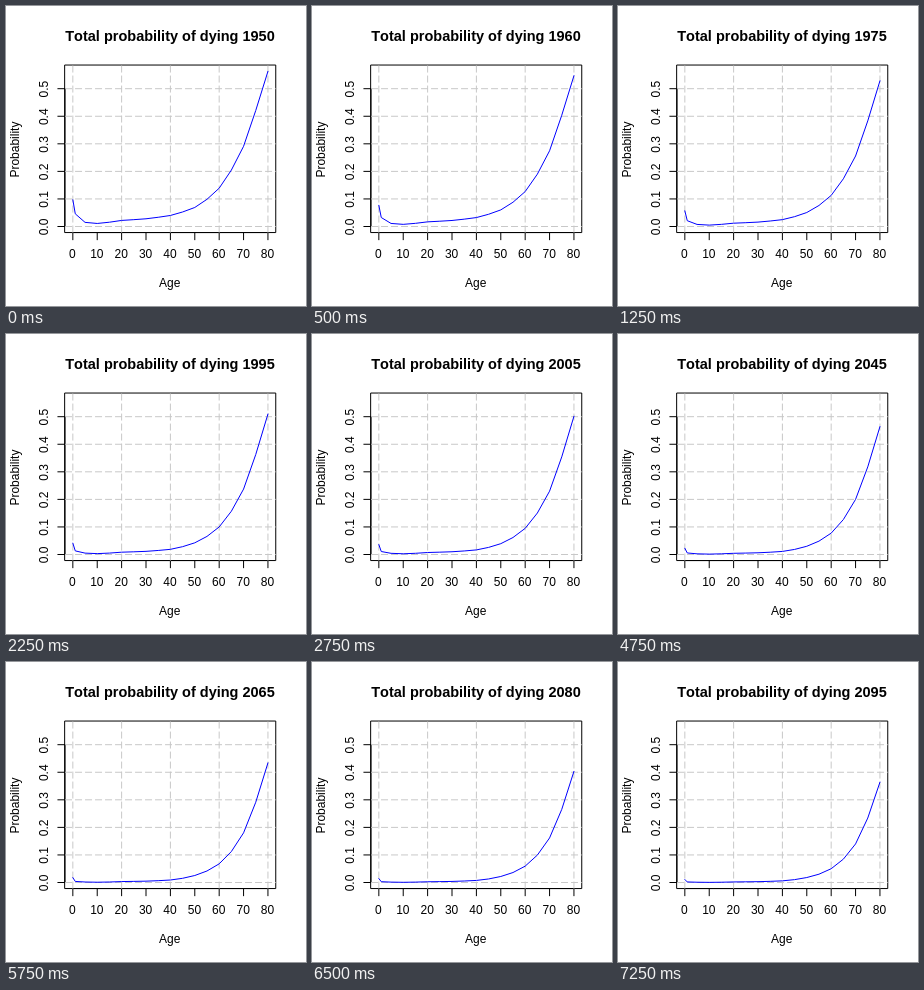
An HTML page that plays this animation: 300x300 px, repeating every 7500 ms.

```html
<!DOCTYPE html>
<html lang="en">
<head>
<meta charset="utf-8">
<title>Total probability of dying</title>
<style>
  html, body { margin: 0; height: 100%; overflow: hidden; background: #fff; }
  svg { display: block; width: 100vw; height: 100vh; }
  text { font: 12px "Liberation Sans", Arial, sans-serif; font-kerning: none; text-anchor: middle; fill: #000; }
  .title { font-size: 14.5px; font-weight: bold; }
  path { fill: none; stroke: #000; stroke-width: 1; stroke-linecap: round; stroke-linejoin: round; }
  .grid { stroke: #c8c8c8; stroke-dasharray: 7 3; stroke-linecap: butt; }
  .curve { stroke: #00f; }
</style>
</head>
<body>
<svg viewBox="0 0 300 300"></svg>
<script>
const STEP = 250, YEARS = 30;
const LEFT = 59.04, TOP = 59.04, RIGHT = 269.76, BOTTOM = 226.56, TICK = 7.2;
const MID_X = (LEFT + RIGHT) / 2, MID_Y = (TOP + BOTTOM) / 2;

// Age, then deaths per thousand in the first and the last year
const keys = [
  [0, 97, 11], [1, 46, 2], [5, 15, 1], [10, 11, .5], [20, 22, 2], [30, 28, 3],
  [40, 40, 6], [50, 69, 18], [60, 139, 50], [70, 291, 140], [80, 563, 364]
];
const ages = [0, 1];
for (let age = 5; age <= 80; age += 5) ages.push(age);

const logit = n => Math.log(n / (1000 - n));
const mix = (a, b, f) => a + (b - a) * f;

// How far the decline has come at t from 0 to 1; it lags at old ages
function decline(age, t) {
  const old = Math.max(0, (age - 40) / 40);
  return 1.75 * (t - t * t) + t ** 3 + old * (t ** 3 - t) / 2;
}

// Logistic rate, linear in logit space between the key ages
function rate(age, t) {
  const k = Math.max(1, keys.findIndex(key => key[0] >= age));
  const [a, b] = [keys[k - 1], keys[k]];
  const f = (age - a[0]) / (b[0] - a[0]);
  const first = mix(logit(a[1]), logit(b[1]), f);
  const last = mix(logit(a[2]), logit(b[2]), f);
  return 1 / (1 + Math.exp(-mix(first, last, decline(age, t))));
}

const px = age => 66.84 + 2.4389 * age;
const py = p => 220.5 - 275.6 * p;

const svg = document.querySelector("svg");
function add(tag, attrs, text = "") {
  const el = document.createElementNS(svg.namespaceURI, tag);
  for (const key in attrs) el.setAttribute(key, attrs[key]);
  el.textContent = text;
  return svg.appendChild(el);
}
const line = (d, cls = "") => add("path", { d, class: cls });
const label = (text, x, y, cls = "") => add("text", { x: x - .4, y, class: cls }, text);
const sideLabel = (text, x, y) =>
  add("text", { transform: `translate(${x} ${y + .5}) rotate(-90)` }, text);

const title = label("", MID_X, 35, "title");
label("Age", MID_X - .3, 281);
sideLabel("Probability", 13, MID_Y + .3);

line(`M${px(0)} ${BOTTOM}H${px(80)}`);
for (let age = 0; age <= 80; age += 10) {
  line(`M${px(age)} ${BOTTOM}v${TICK}`);
  label(age, px(age), 252);
}
line(`M${LEFT} ${py(0)}V${py(.5)}`);
for (let i = 0; i <= 5; i++) {
  line(`M${LEFT} ${py(i / 10)}h${-TICK}`);
  sideLabel((i / 10).toFixed(1), 42, py(i / 10));
}
line(`M${LEFT} ${BOTTOM}H${RIGHT}V${TOP}H${LEFT}Z`);

for (let age = 0; age <= 80; age += 20) line(`M${px(age)} ${BOTTOM}V${TOP}`, "grid");
for (let i = 0; i <= 5; i++) line(`M${LEFT} ${py(i / 10)}H${RIGHT}`, "grid");

const curve = line("", "curve");

let shown;
function draw(now) {
  const i = Math.floor(now / STEP) % YEARS;
  if (i === shown) return;
  shown = i;
  const t = i / (YEARS - 1);
  title.textContent = `Total probability of dying ${1950 + 5 * i}`;
  curve.setAttribute("d", "M" + ages.map(age => `${px(age)} ${py(rate(age, t))}`).join("L"));
}

const start = performance.now();
function tick() {
  draw(performance.now() - start);
  requestAnimationFrame(tick);
}
tick();
</script>
</body>
</html>
```
